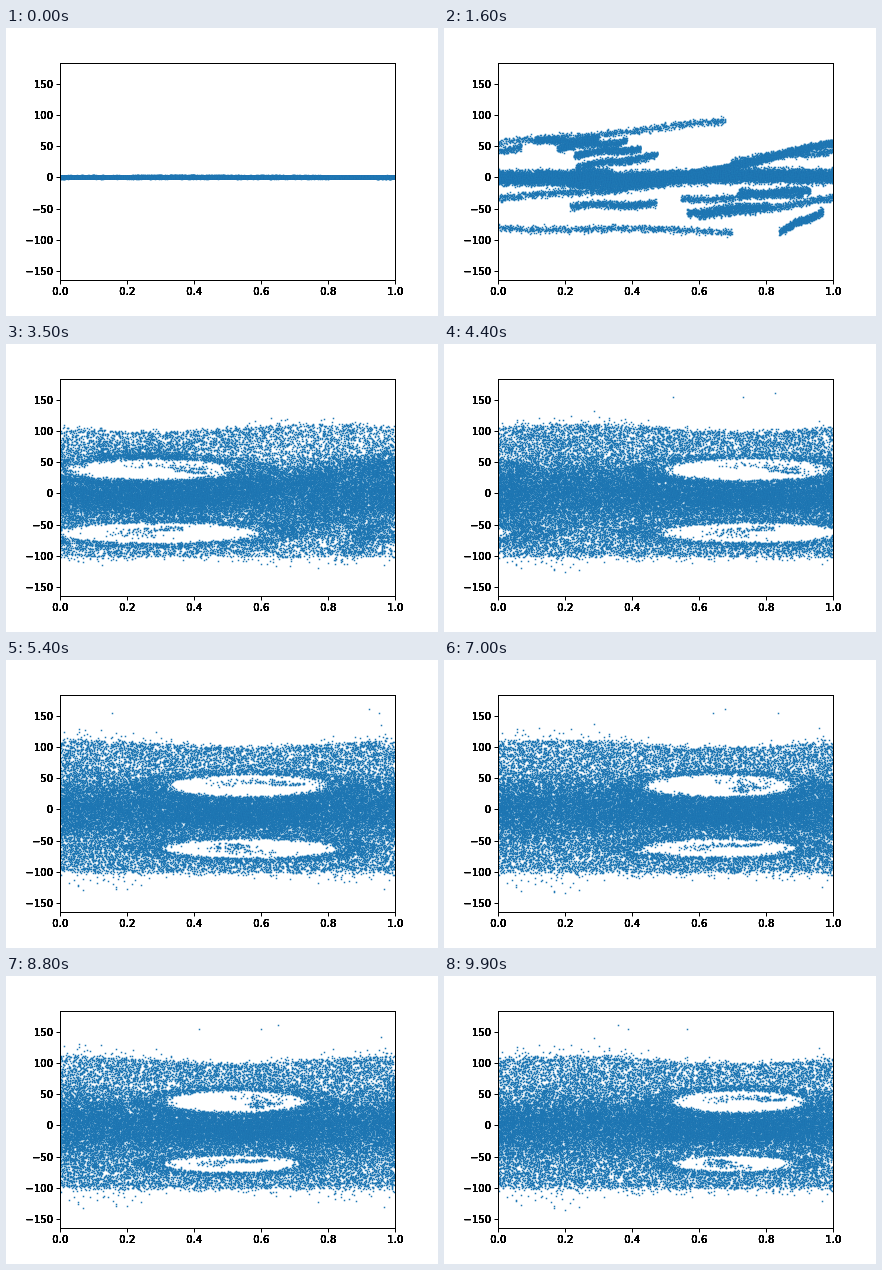
An HTML page with a canvas that plays this animation: 432 px wide and 288 px high, repeating every 10000 ms.

```html
<!DOCTYPE html>
<html>
<head>
<meta charset="utf-8">
<style>
html, body { margin: 0; width: 100%; height: 100%; overflow: hidden; background: #fff; }
canvas { display: block; }
</style>
</head>
<body>
<canvas id="plot" width="432" height="288"></canvas>
<script>
const ctx = document.getElementById('plot').getContext('2d');
const COUNT = 36000, TRAPPED = 130, STEP = 100, STEPS = 100;
const WAVE = 0.3813, DRIFT = 7 / 19; // widths travelled per step, late and early

let seed = 20;
function rand() {
  seed = (seed + 0x6D2B79F5) | 0;
  let t = Math.imul(seed ^ (seed >>> 15), 1 | seed);
  t = (t + Math.imul(t ^ (t >>> 7), 61 | t)) ^ t;
  return ((t ^ (t >>> 14)) >>> 0) / 4294967296;
}
const gauss = () => (rand() + rand() + rand() - 1.5) * 2;
const times = (n, make) => Array.from({ length: n }, (_, i) => make(i));
const wrap = x => x - Math.floor(x);
const clamp = x => Math.min(1, Math.max(0, x));
const lerp = (a, b, t) => a + (b - a) * t;
const px = x => 54.4 + x * 334.8;
const py = v => 149.4 - v * 0.6235;

// Main streams of the early flow: x from, x to, v from, v to
const core = [0, 1, -3, 2];
const riser = [0.55, 1, 0, 58];
const streams = [
  riser, riser, riser,
  [0, 0.68, 57, 95],
  [0, 0.5, -36, -13],
  [0.6, 1, -68, -37],
  [0, 0.7, -86, -91],
  [0.84, 0.97, -92, -58],
  // Short rising side streams, spread evenly over the speeds
  ...times(12, i => {
    const x = 0.75 * rand(), v = -60 + 11 * i;
    return [x, x + 0.15 + 0.25 * rand(), v, v + 22 * rand()];
  })
];

function streamPoint() {
  const inCore = rand() < 0.45;
  const [x0, x1, v0, v1] = inCore ? core : streams[Math.floor(rand() * streams.length)];
  const t = rand(), g = gauss();
  return {
    sx: lerp(x0, x1, t),
    sv: lerp(v0, v1, t) + 2 * Math.sin(t * 8 + v1),
    dev: (inCore ? 5.5 : 3) * (Math.round(g * 1.5) / 1.5 + 0.2 * gauss())
  };
}

function seaPoint() {
  const kind = rand(), up = rand() < 0.52, u = rand();
  const p = { x: rand(), v: -9, core: 0, tail: 0 };
  if (kind < 0.42) p.core = 14 * gauss();
  else if (kind < 0.99) p.v = (up ? 104 * u ** 1.1 : -100 * u ** 0.9) + 2 * gauss();
  else {
    const tail = Math.min(30, -9 * Math.log(u + 1e-9));
    p.v = up ? 100 : -100;
    p.tail = up ? tail : -tail;
  }
  return p;
}

const particles = times(COUNT, () => ({
  ...seaPoint(), ...streamPoint(), mix: rand(), heat: (rand() - 0.5) * 3.4
}));
const trapped = times(TRAPPED, () => [rand(), rand(), rand()]);
const outliers = times(3, () => [rand(), 152 + 16 * rand()]);

function holesAt(n) {
  const x = 0.56 + WAVE * (n - 54) - 0.004 * Math.max(0, 45 - n);
  const grow = clamp((n - 16) / 19), age = Math.max(0, n - 35);
  return [
    { x, v: 38, a: grow * (0.26 - 0.0009 * age), b: grow * 18 },
    { x: x + 0.02 - 0.0006 * age, v: -63.5 + 0.03 * age, a: grow * (0.3 - 0.0018 * age), b: grow * (16.5 - 0.05 * age) }
  ];
}

// Opens an empty ellipse by moving points outward; a few stay just inside the rim
function squeeze(p, hole, mix) {
  const dx = (wrap(p.x - hole.x + 0.5) - 0.5) / hole.a, dv = (p.v - hole.v) / hole.b;
  const r2 = dx * dx + dv * dv + 1e-6, reach = 2.1, rim = 1 - 0.4 * mix ** 5;
  if (r2 > reach) return;
  const k = Math.sqrt((rim + r2 * (reach - rim) / reach) / r2);
  p.x = hole.x + dx * k * hole.a;
  p.v = hole.v + dv * k * hole.b;
}

function dot(x, v) {
  ctx.fillRect(Math.floor(px(wrap(x))) - 0.25, Math.floor(py(v)) - 0.25, 1.5, 1.5);
}

function drawParticles(n) {
  const holes = holesAt(n), open = n > 17;
  const amp = 1 / (1 + Math.exp(-0.45 * (n - 9.7)));
  const sea = clamp((n - 16) / 27);
  const spread = 1 + 0.12 * Math.max(0, n - 16);
  const fringe = Math.min(1, n / 60);
  const point = { x: 0, v: 0 };
  for (const p of particles) {
    if (p.mix < sea) {
      point.x = p.x + (p.v + p.core) * 0.01 * n;
      const far = Math.sin(Math.PI * (point.x - holes[0].x)) ** 2;
      if (p.core) point.v = p.v + 8 * far + p.core * (1 + 0.9 * far);
      else point.v = p.v * (p.v > 0 ? 0.95 + 0.11 * far : 1) + p.tail * fringe * (0.4 + 0.8 * far);
    } else {
      point.x = p.sx + DRIFT * (n - 16);
      point.v = amp * (p.sv + p.dev * spread) + p.heat * (1 - 0.7 * amp);
    }
    if (open) for (const hole of holes) squeeze(point, hole, p.mix);
    dot(point.x, point.v);
  }
  if (n > 22) holes.forEach((hole, i) => {
    for (const [h, k, m] of trapped) {
      const angle = 0.7 * n + 2 * i + 3.4 * h * h, r = 0.2 + 0.45 * k;
      dot(hole.x + hole.a * (r * Math.cos(angle) + 0.2 * m), hole.v + hole.b * r * Math.sin(angle));
    }
  });
  if (n > 40) for (const [x, v] of outliers) dot(x + v * 0.01 * n, v);
}

// Repeated drawing gives the labels their heavy edges
function label(text, x, y) {
  for (let i = 0; i < 10; i++) ctx.fillText(text, x, y);
}

function drawAxes() {
  ctx.fillStyle = '#000';
  ctx.font = '10px "DejaVu Sans", sans-serif';
  ctx.fillRect(54, 35, 336, 1);
  ctx.fillRect(54, 252, 336, 1);
  ctx.fillRect(54, 35, 1, 218);
  ctx.fillRect(389, 35, 1, 218);
  ctx.textAlign = 'center';
  for (let i = 0; i <= 5; i++) {
    const x = 54 + 67 * i;
    ctx.fillRect(x, 253, 1, 3.5);
    label((i / 5).toFixed(1), x + 0.3, 267);
  }
  ctx.textAlign = 'right';
  for (let v = -150; v <= 150; v += 50) {
    const y = Math.round(py(v));
    ctx.fillRect(50.5, y, 3.5, 1);
    label(String(v).replace('-', '\u2212'), 47, y + 4);
  }
}

function draw(n) {
  ctx.fillStyle = '#fff';
  ctx.fillRect(0, 0, 432, 288);
  ctx.save();
  ctx.beginPath();
  ctx.rect(54, 35, 335.5, 217);
  ctx.clip();
  ctx.fillStyle = '#1f77b4';
  drawParticles(n);
  ctx.restore();
  drawAxes();
}

const start = performance.now();
let shown = -1;
function tick() {
  const n = Math.floor((performance.now() - start) / STEP) % STEPS;
  if (n !== shown) draw(shown = n);
  requestAnimationFrame(tick);
}
tick();
</script>
</body>
</html>
```
